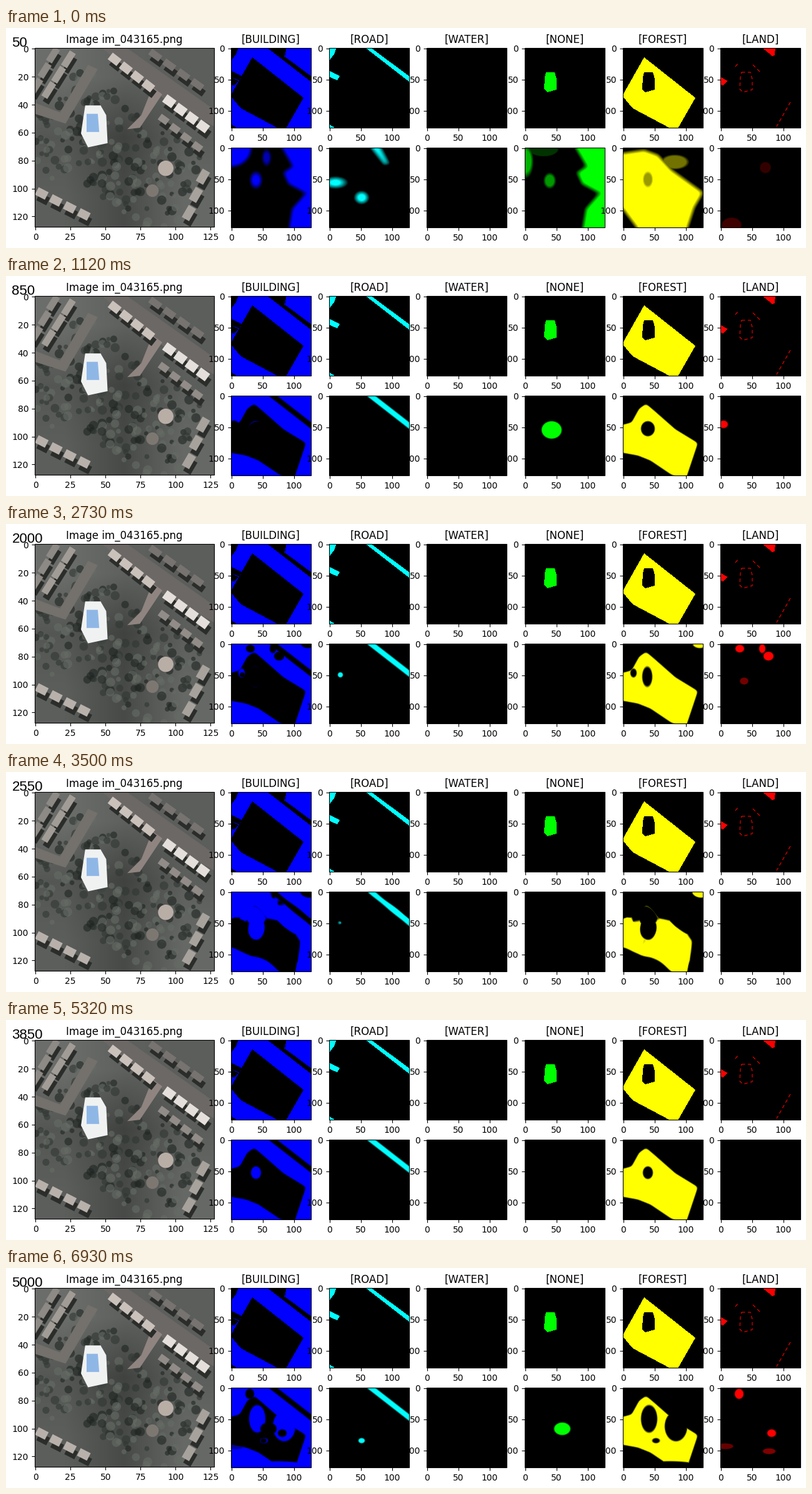
Recreate the animation shown at these times as a matplotlib script. Size 1280x353 px, loop 7000 ms.

```python
import numpy as np
import matplotlib.pyplot as plt
from matplotlib.animation import FuncAnimation
from matplotlib.patches import Circle, Polygon, Rectangle
from matplotlib.path import Path

W, H, N, DPI = 1280, 353, 128, 100
FRAMES, INTERVAL = 100, 70
PT = DPI / 72
MARGIN, FAR = 16, 9.0
COLORS = dict(BUILDING=(0, 0, 1), ROAD=(0, 1, 1), WATER=(0, 0, 1),
              NONE=(0, 1, 0), FOREST=(1, 1, 0), LAND=(1, 0, 0))

axis = np.arange(-MARGIN, N + MARGIN) + 0.5
gx, gy = np.meshgrid(axis, axis)
XY = np.column_stack([gx.ravel(), gy.ravel()])
BLUR = np.exp(-(axis[:, None] - axis) ** 2 / 14)
BLUR /= BLUR.sum(1, keepdims=True)


# ---- distance fields: negative inside a shape ----

def poly_dist(pts, smooth):
    p = np.array(pts, float)
    e = np.roll(p, -1, 0) - p
    w = XY[:, None] - p
    t = np.clip((w * e).sum(-1) / (e * e).sum(-1), 0, 1)
    d = np.linalg.norm(w - t[..., None] * e, axis=-1).min(1)
    d = np.where(Path(p).contains_points(XY), -d, d).reshape(gx.shape)
    return BLUR @ d @ BLUR.T if smooth else d


def oval_dist(x, y, a, b, level=1, soft=2):
    d = (np.hypot((gx - x) / a, (gy - y) / b) - 1) * min(a, b)
    return np.maximum(d, (0.5 - level) * soft) if level < 1 else d


def union(shapes, soft=2, smooth=True):
    """Lists are polygons; tuples are ovals (x, y, a, b[, level])."""
    field = np.full(gx.shape, FAR)
    for s in shapes:
        d = (poly_dist(s, smooth) if isinstance(s, list)
             else oval_dist(*s, soft=soft))
        field = np.minimum(field, d)
    return np.maximum(field, -FAR)


def paint(value, name):
    value = value[MARGIN:-MARGIN, MARGIN:-MARGIN, None]
    return (value * np.array(COLORS[name]) * 255).astype(np.uint8)


# ---- labelled masks of the upper row ----

hole = [(34, 39), (48, 39), (51, 50), (51, 67), (36, 71), (31, 66), (32, 47)]
grove = [(34, 15), (116, 80), (88, 129), (76, 129), (16, 97), (-1, 77)]
roads = [[(57, -1), (66, -1), (129, 46), (129, 55)],
         [(-1, -1), (12, -1), (8, 10), (-1, 22)],
         [(-1, 36), (17, 45), (13, 52), (-1, 46)],
         [(-1, 122), (11, 129), (-1, 129)]]
plots = [[(66, -1), (88, -1), (87, 12), (83, 13)],
         [(-1, 46), (12, 53), (5, 60), (-1, 59)]]
dashes = [hole + hole[:1], [(24, 30), (28, 25)], [(52, 27), (65, 40)],
          [(112, 87), (90, 126)]]

masks = dict(ROAD=roads, WATER=[], NONE=[hole], FOREST=[grove], LAND=plots)
TRUTH = {name: union(s, smooth=False) for name, s in masks.items()}
TRUTH["BUILDING"] = -np.minimum.reduce(
    [TRUTH[n] for n in ("ROAD", "FOREST", "LAND")])
TRUTH["FOREST"] = np.maximum(TRUTH["FOREST"], -TRUTH["NONE"])


# ---- predicted masks: a learned outline plus stray blobs ----

LEARNED = [(-20, 52), (14, 43), (26, 21), (37, 13), (50, 24), (84, 54),
           (120, 76), (101, 133), (78, 127), (44, 104), (24, 96), (-20, 88)]
STREET = [(34, -20), (48, -20), (148, 58), (148, 69)]
EAST = [(70, -20), (99, 30), (84, 40), (92, 58), (120, 73), (98, 98),
        (90, 148), (148, 148), (148, -20)]
FIRST = [(-20, 12), (34, 4), (56, 12), (78, 36), (128, 72), (114, 96),
         (97, 148), (37, 148), (-20, 71)]


def state(cut=(), forest=(), road=(), none=(), land=(), gap=(),
          base=([LEARNED], [STREET]), building=None, soft=2):
    """Buildings fill whatever the other classes leave over."""
    f = dict(FOREST=np.maximum(union([*base[0], *forest], soft),
                               -union(cut, soft)),
             ROAD=union([*base[1], *road], soft),
             NONE=union(none, soft), LAND=union(land, soft))
    rest = -np.minimum.reduce([*f.values(), union(gap)])
    f["BUILDING"] = union(building, soft) if building else rest
    f["soft"] = soft
    return f


corner = (123, 0, 11, 7)
STATES = {
    0: state(base=([FIRST], []), soft=7,
             forest=[(83, 23, 17, 9, .45)], cut=[(40, 51, 5, 8, .4)],
             road=[[(52, -20), (72, -20), (95, 25), (88, 26)],
                   (10, 56, 14, 7), (52, 80, 9, 8)],
             none=[EAST, (2, 22, 9, 20, .7), (30, 2, 18, 9, .2),
                   (40, 53, 7, 9, .6)],
             land=[(72, 32, 6, 6, .2), (18, 124, 12, 9, .25)],
             building=[EAST, (0, 0, 32, 30), (40, 52, 8, 11),
                       (57, 16, 5, 9, .7)]),
    16: state(cut=[(40, 53, 11, 12)], none=[(43, 55, 16, 14)],
              land=[(5, 46, 7, 6)]),
    25: state(cut=[(39, 53, 11, 15), (13, 46, 16, 9)], road=[(18, 50, 7, 5)]),
    39: state(cut=[(39, 53, 8, 16), (17, 47, 5, 7)], forest=[corner],
              road=[(18, 50, 4, 4)], gap=[(39, 53, 10, 18)],
              land=[(31, 8, 7, 6), (67, 8, 5, 7), (77, 20, 8, 7),
                    (38, 60, 6, 5, .45)]),
    61: state(cut=[(40, 24, 50, 30), (42, 60, 18, 18), (32, 84, 7, 8),
                   (125, 80, 20, 50)],
              forest=[corner], road=[(32, 86, 6, 5)], land=[(23, 83, 7, 5)]),
    76: state(cut=[(40, 53, 8, 10)]),
    99: state(cut=[(42, 50, 13, 22), (53, 85, 6, 4), (85, 62, 18, 24),
                   (75, 132, 60, 14)],
              road=[(52, 85, 5, 4)], none=[(60, 66, 13, 10)],
              land=[(30, 10, 7, 8), (82, 73, 7, 6), (8, 94, 11, 4, .4),
                    (78, 102, 9, 4, .5)]),
}
STEPS = list(STATES)


def ripple(seed):
    """Smooth seeded noise, new for every step."""
    rng = np.random.default_rng(seed)
    waves = rng.uniform(-1, 1, (5, 3)) * (.13, .13, np.pi)
    return sum(np.sin(kx * gx + ky * gy + p) for kx, ky, p in waves)


def predict(k):
    i = min(np.searchsorted(STEPS, k, side="right"), len(STEPS) - 1)
    t0, t1 = STEPS[i - 1:i + 1]
    u = (k - t0) / (t1 - t0)
    mix = u ** 0.6 if t0 == 0 else u
    a, b = STATES[t0], STATES[t1]
    lerp = {n: a[n] + (b[n] - a[n]) * mix for n in a}
    soft = lerp.pop("soft")
    noise = ripple(k) * np.sin(np.pi * u) * 0.9
    return {n: np.clip(0.5 - (d - noise if n == "BUILDING" else d + noise)
                       / soft, 0, 1) for n, d in lerp.items()}


# ---- stage ----

plt.rcParams["font.family"] = "DejaVu Sans"
fig = plt.figure(figsize=(W / DPI, H / DPI), dpi=DPI, facecolor="white")
ax = fig.add_axes([0, 0, 1, 1])
ax.axis("off")


def put(img, x, y, size, smooth="nearest"):
    return ax.imshow(img, extent=(x, x + size, y + size, y), aspect="auto",
                     interpolation=smooth)


def frame(x, y, size, xticks, yticks, title=""):
    s = size / N
    bottom = y + size
    ax.add_patch(Rectangle((x, y), size, size, fill=False, lw=0.8, zorder=2.5))
    line = dict(color="black", lw=0.8, solid_capstyle="butt")
    for v in xticks:
        tx = x + (v + .5) * s
        ax.plot((tx, tx), (bottom, bottom + 3.5 * PT), **line)
        ax.text(tx, bottom + 7 * PT, str(v), size=10, ha="center", va="top")
    for v in yticks:
        ty = y + (v + .5) * s
        ax.plot((x - 3.5 * PT, x), (ty, ty), **line)
        ax.text(x - 7 * PT, ty, str(v), size=10, ha="right",
                va="center_baseline")
    ax.text(x + size / 2, y - 6 * PT, title, size=12, ha="center")


def aerial(x, y, size):
    """A flat-shape view of a grove between rows of houses."""
    s = size / N
    clip = ax.add_patch(Rectangle((x, y), size, size, fill=False, lw=0))

    def at(pts):
        return np.array(pts) * s + (x, y)

    def add(patch):
        ax.add_patch(patch).set_clip_path(clip)

    def area(pts, color):
        add(Polygon(at(pts), fc=color, lw=0))

    def roofs(count, start, step, w, h, deg, color):
        c, n = np.cos(np.radians(deg)), np.sin(np.radians(deg))
        box = np.array([(-w, -h), (w, -h), (w, h), (-w, h)]) / 2
        box = box @ np.array([(c, n), (-n, c)])
        for i in range(count):
            mid = np.array(start) + i * np.array(step)
            area(box + mid + (1, 4), "#2b2d2b")
            area(box + mid, color)

    tones = np.array([[.42, .37, .36], [.33, .25, .36], [.36, .28, .40]])
    put(np.stack([tones, tones + .01, tones], -1), x, y, size, "bilinear")

    rng = np.random.default_rng(7)
    spots = rng.uniform(0, N, (420, 2))
    trees = at(spots[Path(LEARNED).contains_points(spots)])
    shade = rng.choice(["#1f2522", "#313733", "#666c66"], len(trees))
    ax.scatter(*trees.T, s=rng.uniform(20, 120, len(trees)), c=shade, lw=0,
               alpha=.6, zorder=1).set_clip_path(clip)

    area([(48, 0), (66, 0), (128, 44), (128, 56), (92, 36)], "#6c6866")
    area([(0, 39), (18, 46), (38, 12), (45, 15), (22, 54), (0, 47)], "#74706c")
    area([(84, 28), (91, 33), (75, 57), (66, 58), (76, 48)], "#8f8480")
    roofs(4, (57, 8), (8, 6.3), 8, 6, 38, "#c9c1ba")
    roofs(4, (96, 38), (8, 6), 8, 6.5, 36, "#e4dfda")
    roofs(4, (92, 51), (8, 6.5), 7, 5, 36, "#918c88")
    roofs(4, (86, 5), (10, 7), 9, 5, 36, "#777370")
    roofs(4, (5, 104), (10, 5), 8, 6, 27, "#b8b1ab")
    roofs(3, (24, 8), (-7, 11), 12, 5, -58, "#a29c96")
    roofs(3, (13, 5), (-6, 11), 11, 5, -58, "#8d8984")
    roofs(3, (120, 92), (-5, 13), 10, 6, -60, "#a8a29d")
    area([(36, 41), (47, 41), (51, 48), (52, 68), (38, 71), (33, 61)],
         "#f0f2f2")
    area([(37, 47), (45, 47), (46, 60), (37, 60)], "#8fb7e6")
    add(Circle(at((93.5, 86)), 5.5 * s, fc="#b9aea6", lw=0))
    add(Circle(at((84, 102)), 4.5 * s, fc="#7d7772", lw=0))


aerial(46, 32.3, 287)
frame(46, 32.3, 287, range(0, N, 25), range(0, N, 20), "Image im_043165.png")

ticks = range(0, N, 50)
panels = {}
for col, name in enumerate(COLORS):
    left = round(359.9 + 156.7 * col)
    put(paint(1.0 * (TRUTH[name] < 0), name), left, 32, N)
    panels[name] = put(paint(np.zeros(gx.shape), name), left, 192, N)
    frame(left, 32, N, ticks, ticks, f"[{name}]")
    frame(left, 192, N, ticks, ticks)
    if name == "LAND":
        for dash in dashes:
            ax.plot(*(np.array(dash) + (left, 32)).T, color="red", lw=0.8,
                    dashes=(5, 4))

counter = ax.text(9.5, 30, "", size=16, family="Liberation Sans")
ax.set_xlim(0, W)
ax.set_ylim(H, 0)


def update(k):
    for name, value in predict(k).items():
        panels[name].set_data(paint(value, name))
    counter.set_text(str(50 * (k + 1)))
    return [*panels.values(), counter]


anim = FuncAnimation(fig, update, frames=FRAMES, interval=INTERVAL,
                     repeat=True, repeat_delay=0)
plt.show()
```
